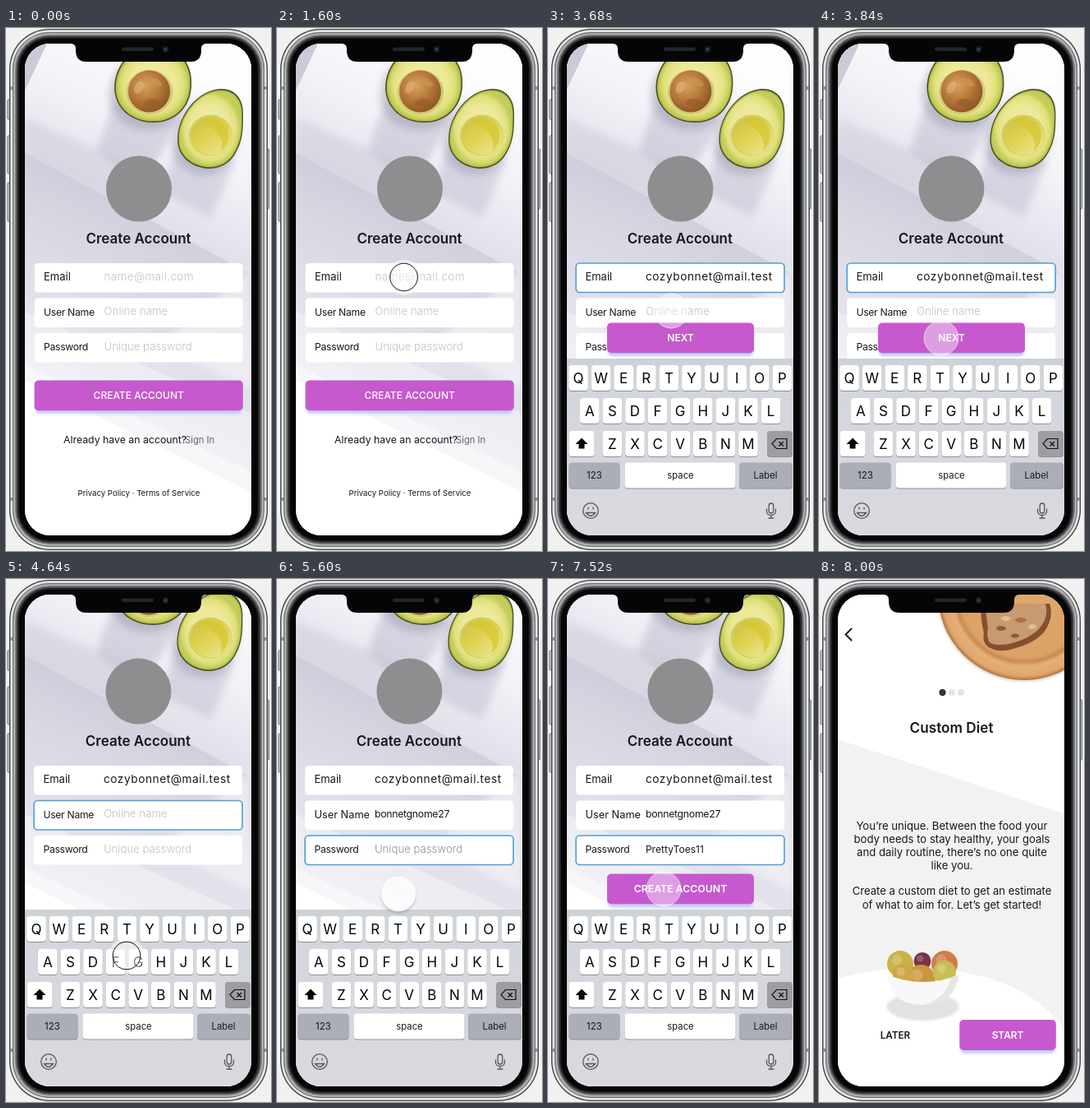
Write an HTML page that moves like this. It is 323 px wide and 636 px high and loops after 8800 ms.

```html
<!DOCTYPE html>
<html lang="en">
<head>
<meta charset="utf-8">
<title>Sign-up flow</title>
<style>
html, body { margin: 0; width: 100%; height: 100%; overflow: hidden; background: #f1f1f1; }
svg { display: block; width: 100vw; height: 100vh; font-family: Inter, Roboto, sans-serif; }
.layer { transform-box: fill-box; transform-origin: center; }
</style>
</head>
<body>
<svg id="stage" viewBox="0 0 323 636">
<defs>
  <clipPath id="screen"><rect x="23" y="19" width="276" height="598" rx="31"/></clipPath>
  <linearGradient id="wall" gradientUnits="userSpaceOnUse" x1="210" y1="40" x2="80" y2="290">
    <stop offset="0" stop-color="#fdfdff"/><stop offset=".35" stop-color="#f2f1f7"/>
    <stop offset=".75" stop-color="#dddce7"/><stop offset="1" stop-color="#d0cfdc"/>
  </linearGradient>
  <linearGradient id="table" gradientUnits="userSpaceOnUse" x1="200" y1="235" x2="100" y2="455">
    <stop offset="0" stop-color="#cfcedb"/><stop offset=".4" stop-color="#dcdbe5"/>
    <stop offset=".8" stop-color="#e6e5ee"/><stop offset="1" stop-color="#eeedf4"/>
  </linearGradient>
  <radialGradient id="flesh">
    <stop offset="0" stop-color="#f1ecac"/><stop offset=".65" stop-color="#ebe896"/>
    <stop offset=".86" stop-color="#e0e07c"/><stop offset="1" stop-color="#c3cc58"/>
  </radialGradient>
  <radialGradient id="pit" cx=".4" cy=".36" r=".68">
    <stop offset="0" stop-color="#d6a361"/><stop offset=".5" stop-color="#b97b3c"/>
    <stop offset="1" stop-color="#8b5323"/>
  </radialGradient>
  <linearGradient id="hollow" x1=".1" y1="0" x2=".8" y2="1">
    <stop offset="0" stop-color="#cfc040"/><stop offset=".5" stop-color="#dfd252"/>
    <stop offset="1" stop-color="#ece58f"/>
  </linearGradient>
  <linearGradient id="board" x1="0" y1="0" x2="0" y2="1">
    <stop offset="0" stop-color="#cbd2d6"/><stop offset=".2" stop-color="#d3d6dc"/>
    <stop offset="1" stop-color="#d9dadf"/>
  </linearGradient>
  <radialGradient id="plate" gradientUnits="userSpaceOnUse" cx="250" cy="18" r="105">
    <stop offset="0" stop-color="#e0a86c"/><stop offset=".74" stop-color="#dca265"/>
    <stop offset=".79" stop-color="#c98b50"/><stop offset=".84" stop-color="#e4b078"/>
    <stop offset=".95" stop-color="#dfa76c"/><stop offset="1" stop-color="#b0753f"/>
  </radialGradient>
  <filter id="blur" x="-50%" y="-50%" width="200%" height="200%"><feGaussianBlur stdDeviation="5"/></filter>
  <filter id="soft" x="-50%" y="-50%" width="200%" height="200%"><feGaussianBlur stdDeviation="1.8"/></filter>
</defs>
<g id="phone"></g>
<g clip-path="url(#screen)">
  <rect x="23" y="19" width="276" height="598" fill="#fff"/>
  <g id="signup">
    <g id="page"></g>
    <g id="keys"></g>
    <g id="popup"></g>
    <g id="touch"></g>
  </g>
  <g id="diet"></g>
</g>
<g id="notch"></g>
</svg>
<script>
const $ = id => document.getElementById(id);
const INK = '#17171c', PINK = '#c659cd', HINT = '#c2c2c8';

const rect = (x, y, w, h, r, fill, more = '') =>
  `<rect x="${x}" y="${y}" width="${w}" height="${h}" rx="${r}" fill="${fill}" ${more}/>`;
const circle = (x, y, r, fill, more = '') =>
  `<circle cx="${x}" cy="${y}" r="${r}" fill="${fill}" ${more}/>`;
const oval = (x, y, rx, ry, fill, more = '') =>
  `<ellipse cx="${x}" cy="${y}" rx="${rx}" ry="${ry}" fill="${fill}" ${more}/>`;
const path = (d, fill, more = '') => `<path d="${d}" fill="${fill}" ${more}/>`;
const text = (x, y, size, str, fill = INK, more = '') =>
  `<text x="${x}" y="${y}" font-size="${size}" fill="${fill}" ${more}>${str}</text>`;
const mid = (x, y, size, str, fill = INK, weight = 400) =>
  text(x, y, size, str, fill, `text-anchor="middle" font-weight="${weight}"`);
const button = (x, y, w, h, label, size, weight, id = '') =>
  rect(x + 1, y + 4, w - 2, h, 5, '#bfc6f8', 'filter="url(#soft)" opacity=".9"') +
  rect(x, y, w, h, 5, PINK) +
  `<g id="${id}">${mid(x + w / 2, y + h / 2 + 4.4, size, label, '#fff', weight)}</g>`;

function phone() {
  const side = [[2, 87, 24], [2, 131, 46], [2, 188, 47], [316.5, 147, 73]]
    .map(([x, y, h]) => rect(x, y, 4, h, 1.2, '#c9cacb', 'stroke="#47484a" stroke-width=".8"')).join('');
  // rim shades from the outer edge inwards
  const shell = [[0, '#3a3b3c'], [1.3, '#e3e4e4'], [4, '#6d6e70'], [5.2, '#b4b5b6'], [7, '#7d7e80'],
    [8.5, '#4b4c4e'], [10, '#232425'], [12, '#060607']]
    .map(([d, c]) => rect(4 + d, 1 + d, 315 - 2 * d, 634 - 2 * d, 49 - d, c)).join('');
  const bands = [71, 571].map(y => rect(5.3, y, 2.7, 4, 0, '#8b8c8e') + rect(315, y, 2.7, 4, 0, '#8b8c8e')).join('');
  return side + shell + bands;
}

const notch = () =>
  path('M79 18H244V19Q238 19.5 238 25V27Q238 41 225 41H98Q85 41 85 27V25Q85 19.5 79 19Z', '#050506') +
  rect(141, 23.5, 39, 4.5, 2.2, '#242528') + circle(194.5, 26, 4, '#15181f') +
  circle(194.5, 26, 2, '#28405e');

function avocados() {
  const one = 'M181 22C212 22 228 44 226 70C225 97 206 115 180 115C152 115 132 97 132 72C133 45 152 22 181 22Z';
  const two = 'M261 74C278 73 289 85 289 103C289 122 289 135 281 150C274 164 262 171 247 171' +
    'C226 170 209 156 209 136C209 119 216 105 225 94C235 82 247 75 261 74Z';
  const layer = (d, fill, scale) => path(d, fill, `class="layer" style="scale:${scale}"`);
  const half = d => path(d, '#4b5425') + layer(d, '#b6c24e', .965) + layer(d, 'url(#flesh)', .925);
  const shade = (d, x, y) =>
    path(d, '#8d8ca2', `transform="translate(${x} ${y})" filter="url(#blur)" opacity=".4"`);
  return path('M134 85L110 150L165 190L215 110Z', '#b9b8ca', 'filter="url(#blur)" opacity=".5"') +
    path('M210 140L190 200L250 230L280 160Z', '#b9b8ca', 'filter="url(#blur)" opacity=".45"') +
    shade(one, -6, 9) + shade(two, -6, 8) +
    half(one) + oval(175, 78, 28.5, 27, '#d3ca74') + oval(174.5, 77, 25.5, 25.5, 'url(#pit)') +
    oval(162, 72, 5, 8, '#dfb67c', 'transform="rotate(30 162 72)" opacity=".6"') +
    oval(182, 66, 9, 4, '#cc9650', 'transform="rotate(25 182 66)" opacity=".7"') +
    oval(178, 91, 10, 5, '#8f5726', 'opacity=".5"') +
    half(two) + oval(249.5, 130.5, 26.5, 25, '#d3cf66') + oval(250.5, 131, 25, 23.5, 'url(#hollow)') +
    path('M236 113Q256 104 269 120Q276 139 262 150Q270 128 236 113Z', '#d6c62f', 'opacity=".7"');
}

const rows = [
  { id: 'email', y: 286, label: 'Email', size: 13, hint: 'name@mail.com', hs: 13.6, hl: .3,
    value: 'cozybonnet@mail.test', vs: 13.7, vl: .55 },
  { id: 'user', y: 328.5, label: 'User Name', size: 12.2, hint: 'Online name', hs: 13.3, hl: 0,
    value: 'bonnetgnome27', vs: 12.3, vl: -.3 },
  { id: 'pass', y: 371, label: 'Password', size: 12.2, hint: 'Unique password', hs: 13.2, hl: 0,
    value: 'PrettyToes11', vs: 12.1, vl: 0 }
];
const field = (f, i) =>
  rect(34.7, f.y, 254, 35.5, 4.5, '#fff', `id="${f.id}-box"`) +
  text(46, f.y + 21.4, f.size, f.label, INK, `id="${f.id}-label" letter-spacing="${i ? -.3 : 0}"`) +
  text(119.5, f.y + 20.8, f.hs, f.hint, HINT, `id="${f.id}-hint" font-weight="300" letter-spacing="${f.hl}"`) +
  text(119.5, f.y + 20.8, f.vs, f.value, INK, `id="${f.id}-value" letter-spacing="${f.vl}"`);

const page = () =>
  rect(23, 19, 276, 660, 0, '#fff') +
  path('M23 19H300V310L23 152Z', 'url(#wall)') +
  path('M23 152L300 300V545L23 412Z', 'url(#table)') +
  path('M23 412L300 545V470L23 345Z', '#f6f5fa', 'opacity=".55"') +
  path('M23 410L300 540V565L23 428Z', '#f7f7fa') +
  path('M300 290V440L190 385Z', '#f4f3f8', 'opacity=".7" filter="url(#blur)"') +
  path('M23 110L160 168L140 215L23 165Z', '#cfcedb', 'opacity=".55" filter="url(#blur)"') +
  path('M23 19H50L23 76Z', '#cbcad7') +
  avocados() + circle(162, 195.5, 40, '#8e8e91') +
  mid(161.5, 262, 17, 'Create Account', INK, 600) +
  rows.map(field).join('') +
  `<g id="foot">${button(34.6, 428.5, 254.2, 36.7, 'CREATE ACCOUNT', 12, 500)}` +
  text(70, 505, 12.3, 'Already have an account?') +
  text(218, 505, 11.2, 'Sign In', '#66666c') +
  mid(162, 569.3, 9.6, 'Privacy Policy · Terms of Service') + '</g>';

function keyboard() {
  const key = (x, y, w, fill = '#fff') =>
    rect(x, y + 1, w, 31, 4, '#8d9096') + rect(x, y, w, 31, 4, fill);
  const line = (chars, x, y) => [...chars].map((c, i) =>
    key(x + i * 27.6 - 11.8, y, 23.6) + mid(x + i * 27.6, y + 21.6, 17, c, '#050505')).join('');
  const thin = 'fill="none" stroke="#55585e" stroke-width="1.3" stroke-linecap="round"';
  return rect(23, 402, 276, 216, 0, 'url(#board)') +
    line('QWERTYUIOP', 37, 410) + line('ASDFGHJKL', 50.8, 450) + line('ZXCVBNM', 78.4, 490) +
    key(25.5, 490, 31) + path('M41 498.5L48.5 506H44.5V511.5H37.5V506H33.5Z', '#000') +
    key(267, 490, 31, '#9d9ea3') +
    path('M278.5 499.5H291V511.5H278.5L273 505.5ZM281.5 503L287 508.5M287 503L281.5 508.5', 'none',
      'stroke="#111" stroke-width="1.2"') +
    key(25.5, 528.5, 62, '#abaeb7') + mid(56.5, 548, 11.5, '123') +
    key(93.5, 528.5, 135) + mid(161.5, 547.5, 11.3, 'space') +
    key(233, 528.5, 65, '#abaeb7') + mid(265, 547.5, 11.3, 'Label') +
    circle(52, 587, 9.3, 'none', thin) + path('M46.5 589.5Q52 597 57.5 589.5ZM49 583V585M55 583V585', 'none', thin) +
    rect(269.2, 578, 5.6, 12, 2.8, 'none', thin) +
    path('M266.5 585V588Q267 592.5 272 592.5Q277 592.5 277.5 588V585M272 593V596M269 596H275', 'none', thin);
}

function diet() {
  const lines = [[304.5, 'You’re unique. Between the food your'], [320.7, 'body needs to stay healthy, your goals'],
    [336.9, 'and daily routine, there’s no one quite'], [353.1, 'like you.'],
    [384.3, 'Create a custom diet to get an estimate'], [400.5, 'of what to aim for. Let’s get started!']];
  const fruit = [[99, 468, 16, '#c9b347'], [153, 468, 16, '#cf7d4c'], [126, 464.5, 10.5, '#793447'],
    [124, 487, 18, '#cb963f'], [153, 478, 14, '#c9bd55'], [103, 481, 13, '#d0a746']];
  return rect(23, 19, 276, 598, 0, '#fff') +
    path('M23 195L300 286V548Q262 497 190 481Q105 462 23 486Z', '#f2f2f2') +
    circle(250, 19, 106, '#b9b3ad', 'filter="url(#soft)" opacity=".5"') +
    circle(250, 18, 105, 'url(#plate)') +
    path('M197 30H281Q287 47 274 65Q262 78 240 84Q221 90 211 85Q198 80 201 66Q197 50 197 30Z', '#85502d') +
    path('M202 30H276Q281 47 267 62Q253 74 231 79Q212 82 207 76Q204 68 206 60Z', '#c79a70') +
    oval(222, 60, 6, 3, '#8f5b38') + oval(246, 50, 7, 3, '#a87148') +
    oval(239, 69, 5, 2.5, '#8f5b38') + oval(260, 58, 5, 3, '#dfbd95') + oval(228, 48, 6, 3, '#dfbd95') +
    path('M39.5 60.5L32.5 67.5L39.5 74.5', 'none', 'stroke="#1b1b20" stroke-width="2" stroke-linecap="round"') +
    circle(150.5, 138, 4.2, '#353539') + circle(161.8, 138, 4, '#e4e4e9') + circle(173, 138, 4, '#e4e4e9') +
    mid(161.5, 187, 17.2, 'Custom Diet', INK, 600) +
    lines.map(([y, s]) => mid(162, y, 13.1, s)).join('') +
    oval(126.5, 520, 44, 17, '#e2e2e3', 'filter="url(#soft)"') +
    fruit.map(([x, y, r, c]) => circle(x, y, r, c) +
      circle(x - r * .25, y - r * .3, r * .4, '#fff', 'opacity=".2"')).join('') +
    path('M83 481Q104 490 127 490Q151 490 170 481Q168 505 148 515Q127 521 106 515Q85 505 83 481Z', '#f8f8f9') +
    path('M170 481Q168 505 148 515Q138 518 127 518Q157 509 160 485Z', '#e6e6e8') +
    mid(93, 558.5, 11.7, 'LATER', INK, 600) + button(171.3, 536, 117.5, 37, 'START', 11.9, 600);
}

$('phone').innerHTML = phone();
$('notch').innerHTML = notch();
$('page').innerHTML = page();
$('keys').innerHTML = keyboard();
$('popup').innerHTML = button(72, 358.5, 179, 36.7, 'NEXT', 12, 600, 'next');
$('diet').innerHTML = diet();
$('touch').innerHTML =
  circle(0, 2.5, 21, '#55556a', 'id="shade" filter="url(#soft)" opacity=".3"') +
  circle(0, 0, 21, '#fff', 'id="disc" stroke="#fff" stroke-width="1"') +
  circle(0, 0, 16.8, 'none', 'id="ring" stroke="#111" stroke-width="1"');

// time, x, y of the finger
const trail = [[160, 166, 285], [1120, 154.6, 303], [1920, 154.6, 303], [2720, 148, 483], [3040, 148, 483],
  [3200, 148, 472], [3680, 150, 344], [3840, 149, 377], [4000, 149, 379], [4640, 147, 458],
  [4800, 147, 459], [5280, 148, 383], [5920, 148, 383], [6560, 146, 475], [6720, 146, 475],
  [7360, 141, 377], [8000, 141, 377]];
const ease = p => p * p * (3 - 2 * p);

function finger(t) {
  const i = trail.findIndex(k => k[0] > t);
  if (i < 1) return trail[i ? trail.length - 1 : 0].slice(1);
  const [t0, x0, y0] = trail[i - 1], [t1, x1, y1] = trail[i];
  const p = ease((t - t0) / (t1 - t0));
  return [x0 + (x1 - x0) * p, y0 + (y1 - y0) * p];
}

const show = (id, on) => $(id).setAttribute('visibility', on ? 'inherit' : 'hidden');
const within = (t, spans) => spans.some(([a, b]) => t >= a && t < b);
const set = (id, attrs) => { for (const k in attrs) $(id).setAttribute(k, attrs[k]); };

function draw(t) {
  const typing = t >= 1760, scrolled = t >= 4000, done = t >= 8000;
  show('signup', !done);
  show('diet', done);
  if (done) return;

  set('page', { transform: `translate(${typing ? -.6 : 0} ${scrolled ? -59 : 0})` });
  show('foot', !typing);
  show('keys', typing);

  const focus = !typing ? -1 : t < 4000 ? 0 : t < 5600 ? 1 : 2;
  const filled = [t >= 3200, t >= 4800, t >= 6880];
  rows.forEach((f, i) => {
    set(f.id + '-box', { stroke: i === focus ? '#4d9fd6' : 'none', 'stroke-width': 1.6 });
    show(f.id + '-hint', !filled[i]);
    show(f.id + '-value', filled[i]);
  });
  set('user-label', { 'font-size': filled[1] ? 12.8 : 12.2, 'letter-spacing': filled[1] ? 0 : -.3 });
  set('pass-hint', { fill: focus === 2 ? '#929297' : HINT });

  show('popup', within(t, [[3200, 4000], [4800, 5600], [6880, 8000]]));
  const label = $('next').firstChild;
  label.textContent = focus === 2 ? 'CREATE ACCOUNT' : 'NEXT';
  label.setAttribute('font-size', focus === 2 ? 12.3 : 12);

  const [x, y] = finger(t);
  const press = within(t, [[1600, 1760], [3040, 3200], [4640, 4800], [6720, 6880]]);
  const clear = within(t, [[3360, 4000], [4960, 5440], [7040, 8000]]);
  set('touch', { transform: `translate(${x} ${y})`, opacity: Math.min(1, t / 800) });
  show('touch', t >= 160);
  show('shade', !press && !clear);
  show('ring', press);
  set('disc', { 'fill-opacity': press ? .5 : clear ? .42 : .93, 'stroke-opacity': clear ? .55 : .3 });
}

const start = performance.now();
function tick() {
  const t = (performance.now() - start) % 8800;
  draw(Math.floor(t / 160) * 160);
  requestAnimationFrame(tick);
}
tick();
</script>
</body>
</html>
```
